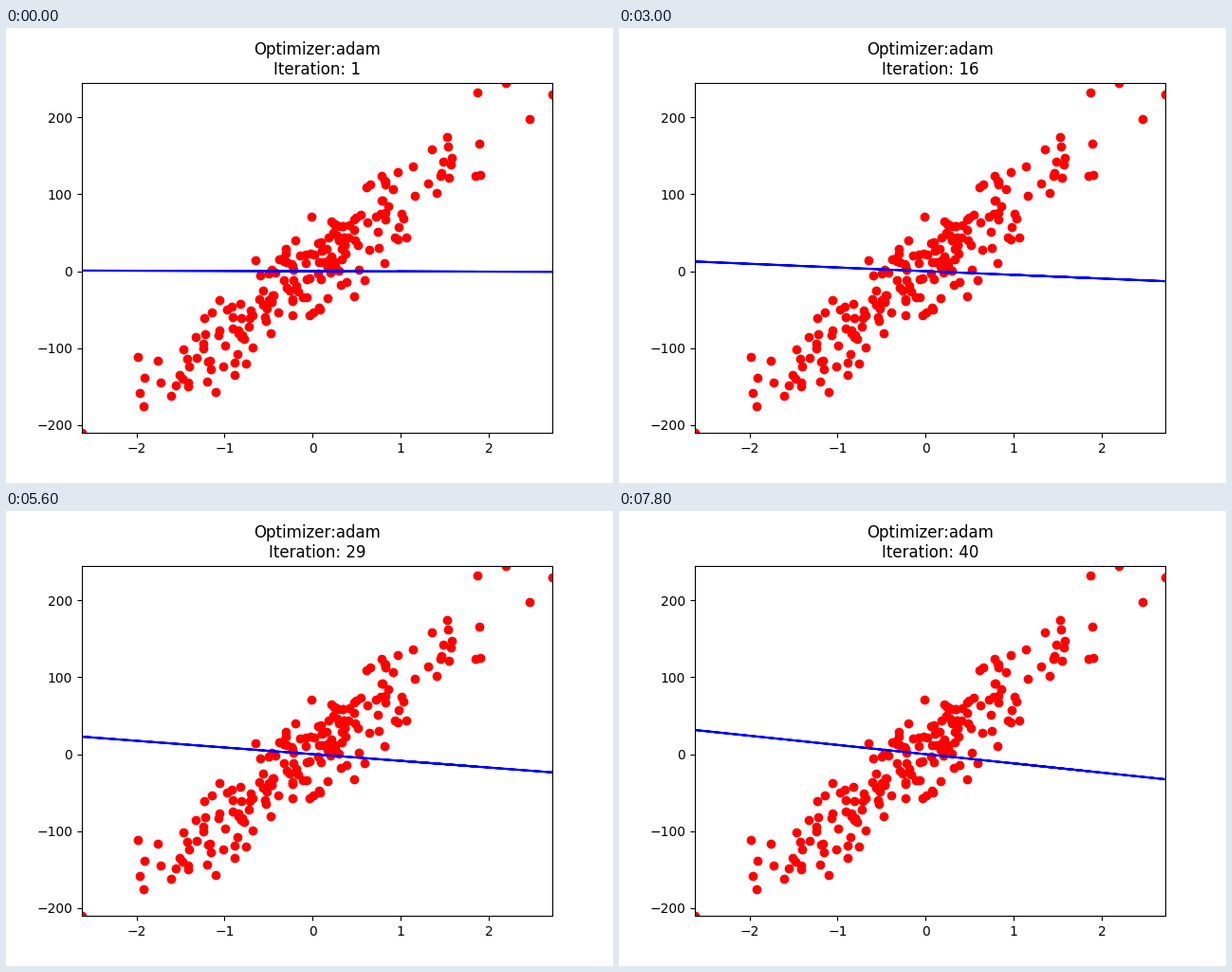
Write a matplotlib script that moves like this. It is 640 by 480 pixels and loops after 8000 ms.

```python
import numpy as np
import matplotlib.pyplot as plt
from matplotlib.animation import FuncAnimation

FRAMES = 40
STEP_MS = 200
RATE = 0.3      # slope change per iteration
SAMPLES = 200
NOISE = 30


def make_data(seed=42):
    """Noisy linear data: normal x, random slope, shuffled rows."""
    rng = np.random.RandomState(seed)
    x = rng.standard_normal(SAMPLES)
    slope = 100 * rng.uniform()
    y = slope * x + rng.normal(scale=NOISE, size=SAMPLES)
    order = np.arange(SAMPLES)
    rng.shuffle(order)
    return x[order], y[order]


x, y = make_data()

fig, ax = plt.subplots(figsize=(6.4, 4.8), dpi=100)
ax.plot(x, y, "ro")
line, = ax.plot(x, 0 * x, "b-")
ax.set_xlim(x.min(), x.max())
ax.set_ylim(y.min(), y.max())
title = ax.set_title("")


def draw(i):
    step = i + 1
    line.set_ydata(-RATE * step * x)
    title.set_text(f"Optimizer:adam\nIteration: {step}")
    return line, title


anim = FuncAnimation(fig, draw, frames=FRAMES, interval=STEP_MS,
                     init_func=lambda: draw(0), repeat=True, repeat_delay=0)
plt.show()
```
